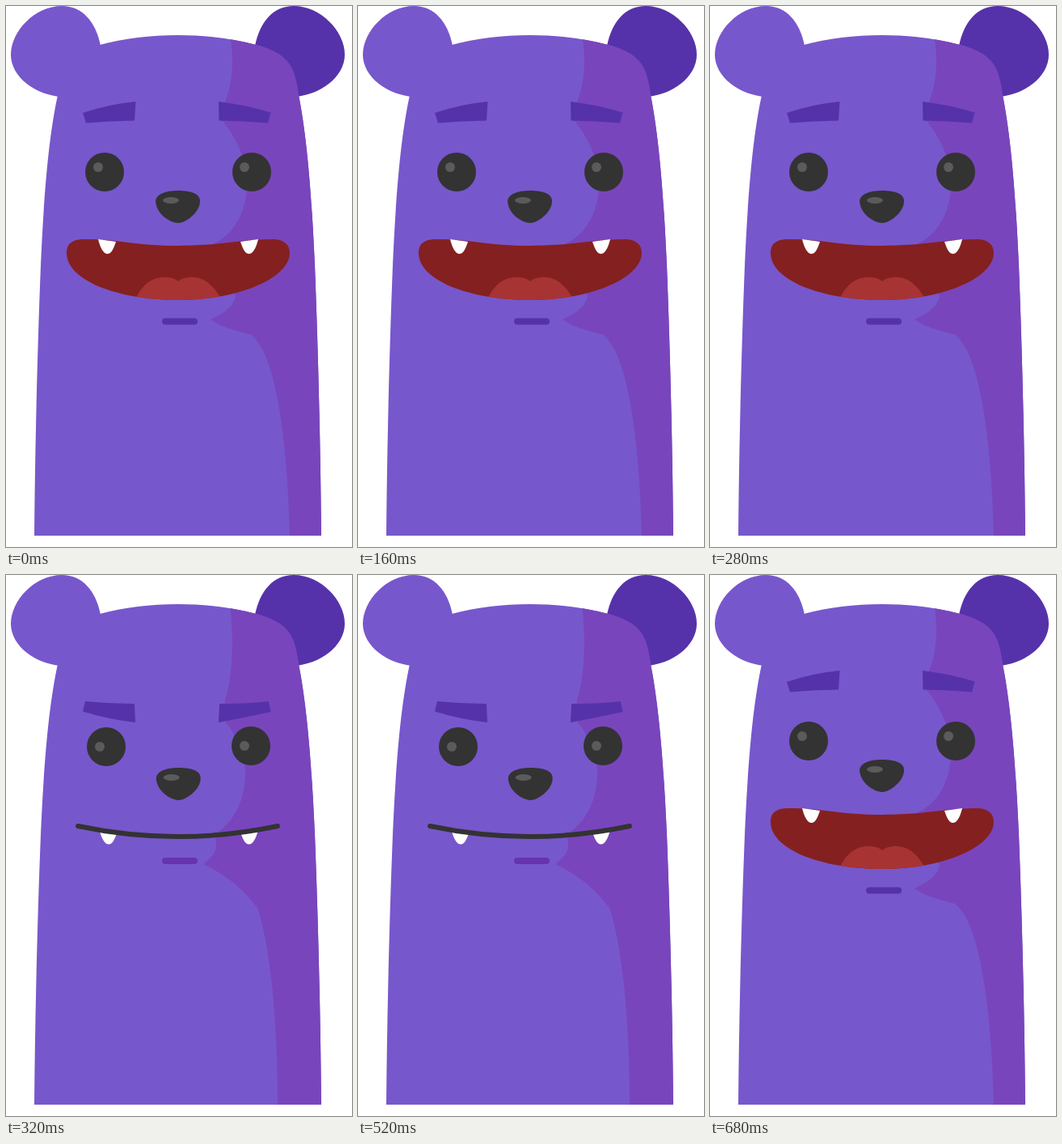
An HTML page for the animation above (720 ms loop, 428 by 668 pixels).

```html
<!DOCTYPE html>
<html lang="en">
<head>
<meta charset="utf-8">
<title>Purple bear</title>
<style>
html, body { margin: 0; width: 100%; height: 100%; overflow: hidden; background: #fff; }
svg { display: block; width: 428px; height: 668px; }
.fur { fill: #7757cc; }
.shade { fill: #7945bc; }
.dark { fill: #5632aa; }
.ink { fill: #333; }
.shine { fill: #5b5b5b; }
.tooth { fill: #fff; }
/* mouth shut from 320 to 560 ms */
.open, .closed { animation: swap 720ms step-end infinite; }
.closed { visibility: hidden; animation-name: swap-back; }
@keyframes swap {
  0% { visibility: visible; }
  44.4% { visibility: hidden; }
  77.7% { visibility: visible; }
}
@keyframes swap-back {
  0% { visibility: hidden; }
  44.4% { visibility: visible; }
  77.7% { visibility: hidden; }
}
</style>
</head>
<body>
<svg viewBox="0 0 428 668">
  <defs>
    <path id="body" d="M35 654C36 540 39 420 43 320C47 230 53 160 64 110C70 75 75 60 116 48C175 32 250.500 32 309.500 48C352 60 357 76 362 110C372 160 378 230 382 320C386 420 389 540 390 654Z"/>
    <path id="ear" d="M117 49C111 20 95 0 69 0C36 0 6 31 6 60C6 88 37 110 68 112L110 90Z"/>
    <path id="mouth" d="M75 305C75 292 84 288 97 288C140 288 160 296 213 296C266 296 290 288 330 288C343 288 351 294 351 305C351 335 290 363 213 363C136 363 75 338 75 305Z"/>
    <path id="tooth" class="tooth" d="M0 0L22 3C19 12 16 18 11.500 18C7 18 3 12 0 0Z"/>
    <g id="nose">
      <path class="ink" d="M185 241C186 232 197 228 213 228C230 228 240 232 240 241C240 255 222 268 213 268C204 268 186 258 185 241Z"/>
      <ellipse class="shine" cx="204" cy="240" rx="10" ry="4"/>
    </g>
    <circle id="eye" class="ink" r="24"/>
    <circle id="glint" class="shine" r="6"/>
    <rect id="chin" x="193" width="44" height="8" rx="4"/>
    <clipPath id="in-body"><use href="#body"/></clipPath>
    <clipPath id="in-mouth"><use href="#mouth"/></clipPath>
  </defs>

  <use href="#ear" class="dark" transform="matrix(-1 0 0 1 425 0)"/>
  <use href="#body" class="fur"/>
  <use href="#ear" class="fur"/>

  <g class="open">
    <path class="shade" clip-path="url(#in-body)" d="M276 30C283 66 281 98 268 125V142C289 168 298 195 298 218C298 252 284 280 258 293L284 358C282 372 268 380 253 387C265 397 290 402 303 406C335 430 348 540 351 654H400V30Z"/>
    <path class="dark" d="M95 132Q128 121 160.500 118L159 141.500Q128 142 99 144.500Z"/>
    <path class="dark" d="M263 118Q297 122 327.500 131.500L324 144.500Q295 142 263.500 141.500Z"/>
    <use href="#eye" x="122" y="205"/>
    <use href="#glint" x="114" y="199"/>
    <use href="#eye" x="304" y="205"/>
    <use href="#glint" x="295" y="199"/>
    <use href="#nose"/>
    <use href="#mouth" fill="#852020"/>
    <path clip-path="url(#in-mouth)" fill="#a83333" d="M161 360C170 341 185 333 200 335Q209 336 213 340Q217 336 226 335C245 333 257 346 265 360V368H161Z"/>
    <use href="#tooth" transform="translate(114 288)"/>
    <use href="#tooth" transform="matrix(-1 0 0 1 312 288)"/>
    <use href="#chin" y="385.500" class="dark"/>
  </g>

  <g class="closed">
    <path class="shade" clip-path="url(#in-body)" d="M276 30C283 75 280 130 271 154V181C289 203 296 225 296 242C296 280 282 304 259 320L260 337C257 347 250 352 244 357C272 370 293 387 311 411C328 460 336 560 336 654H400V30Z"/>
    <path class="dark" d="M98 156Q128 159 159 159L160 182Q125 178 95 168.500Z"/>
    <path class="dark" d="M264 159Q300 159 325 156L327.500 169Q290 177 263 182Z"/>
    <use href="#eye" x="124" y="212"/>
    <use href="#glint" x="116" y="212"/>
    <use href="#eye" x="303" y="211"/>
    <use href="#glint" x="295" y="211"/>
    <use href="#nose" x="0.700" y="10"/>
    <use href="#tooth" transform="translate(115.500 314.500)"/>
    <use href="#tooth" transform="matrix(-1 0 0 1 312 314.500)"/>
    <path d="M89 310Q213 336 336 310" fill="none" stroke="#333" stroke-width="6" stroke-linecap="round"/>
    <use href="#chin" y="349" fill="#6634ae"/>
  </g>
</svg>
</body>
</html>
```
